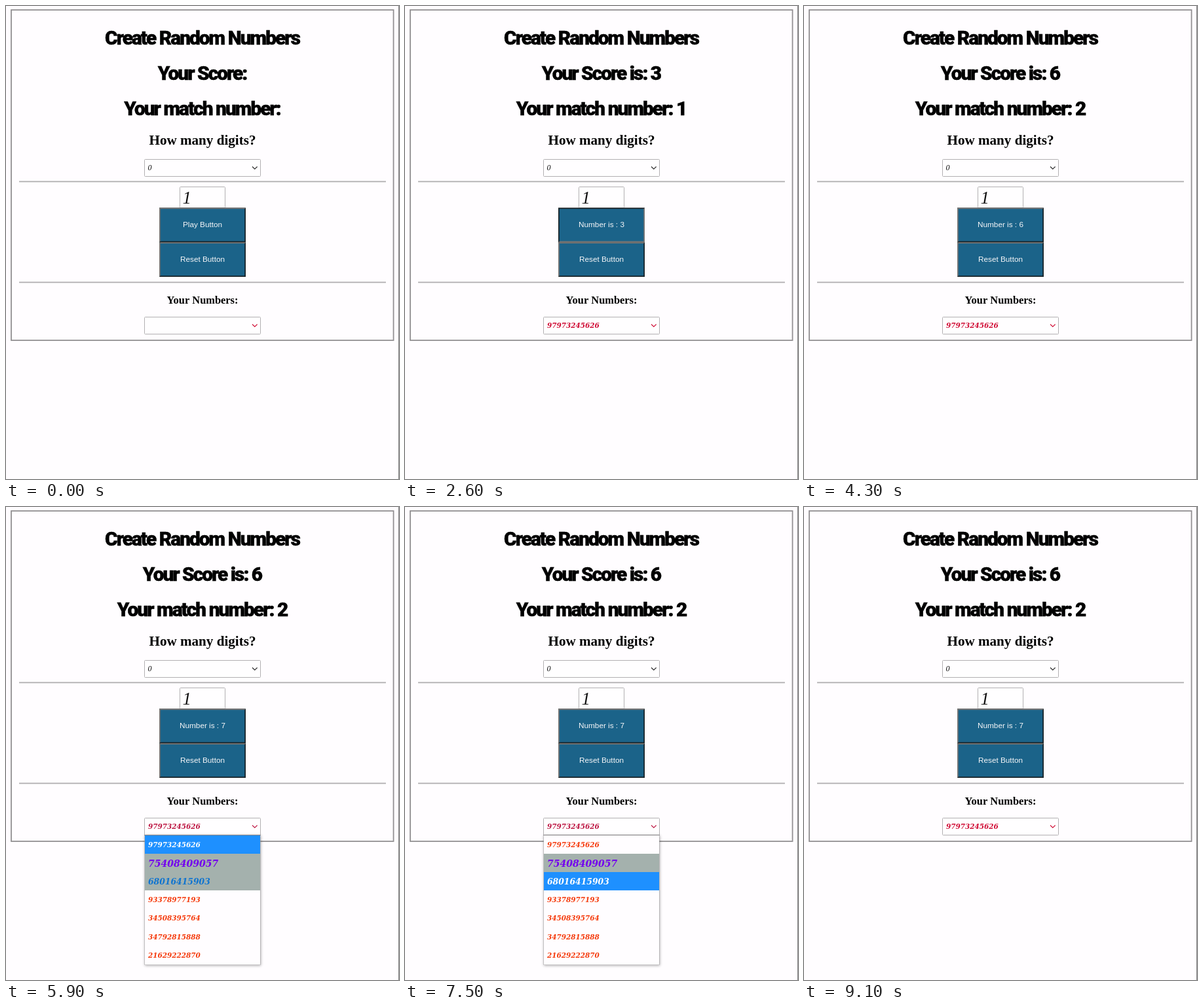
Recreate the animation shown at these times as an HTML page with a canvas. Size 600x723 px, loop 9.2 s.

```html
<!DOCTYPE html>
<html lang="en">
<head>
<meta charset="utf-8">
<title>Create Random Numbers</title>
<style>
html, body { margin: 0; width: 100%; height: 100%; overflow: hidden; background: #fffdff; }
canvas { display: block; }
</style>
</head>
<body>
<canvas id="stage" width="600" height="723"></canvas>
<script>
const ctx = document.getElementById('stage').getContext('2d');
const LOOP = 9200;
const PAGE = '#fffdff';
const SERIF = '"Liberation Serif", serif';
const SANS = '"Liberation Sans", sans-serif';
const DIGITS = '"DejaVu Serif", serif';
const TITLE = 'Create Random Numbers';

const numbers = ['97973245626', '75408409057', '68016415903', '93378977193',
  '34508395764', '34792815888', '21629222870'];
const options = numbers.map((text, i) => ({
  text,
  size: [10.45, 14, 12.4][i] || 10.45,
  color: ['#f53a0c', '#7300ee', '#0f74d0'][i] || '#f53a0c',
  fill: i === 1 || i === 2 ? '#a4b1ad' : PAGE
}));

const plays = [
  { down: 1100, up: 1300, drawn: 1, score: 0, matches: 0 },
  { down: 1800, up: 2000, drawn: 3, score: 3, matches: 1 },
  { down: 2600, up: 2800, drawn: 2, score: 6, matches: 2 },
  { down: 3200, up: 3400, drawn: 4, score: 6, matches: 2 },
  { down: 3600, up: 3800, drawn: 5, score: 6, matches: 2 },
  { down: 4100, up: 4300, drawn: 6, score: 6, matches: 2 },
  { down: 4800, up: 5000, drawn: 7, score: 6, matches: 2 }
];
const menu = { focus: 5300, open: 5900, close: 9100 };
const hovers = [6500, 7400, 8100, 8200, 8300, 8400];

function rect(x, y, w, h, color) {
  ctx.fillStyle = color;
  ctx.fillRect(x, y, w, h);
}

function text(str, x, y, font, color = '#000', align = 'center') {
  ctx.font = font;
  ctx.fillStyle = color;
  ctx.textAlign = align;
  ctx.fillText(str, x, y);
}

function setHeadingFont(family, size) {
  ctx.font = `900 ${size}px ${family}`;
  ctx.fontStretch = 'extra-condensed';
  ctx.letterSpacing = `${-0.065 * size}px`;
}

// Use the narrowest heavy face available for the headings.
function pickHeadingFace() {
  ctx.save();
  const faces = ['"Noto Sans", sans-serif', '"Open Sans", sans-serif', 'Roboto, sans-serif', SANS]
    .map(family => {
      setHeadingFont(family, 100);
      return { family, em: ctx.measureText(TITLE).width / 100 };
    });
  ctx.restore();
  const best = faces.reduce((a, b) => (b.em < a.em ? b : a));
  return { family: best.family, size: Math.min(33, 297 / best.em) };
}
const face = pickHeadingFace();

function heading(str, y) {
  ctx.save();
  setHeadingFont(face.family, face.size);
  ctx.textAlign = 'center';
  ctx.fillStyle = ctx.strokeStyle = '#000';
  ctx.lineWidth = 0.5;
  ctx.lineJoin = 'round';
  ctx.fillText(str, 299.5, y);
  ctx.strokeText(str, 299.5, y);
  ctx.restore();
}

function field(x, y, w, h) {
  ctx.beginPath();
  ctx.roundRect(x + 0.5, y + 0.5, w - 1, h - 1, 1);
  ctx.fillStyle = '#fffeff';
  ctx.fill();
  ctx.strokeStyle = '#b2b0b2';
  ctx.lineWidth = 1;
  ctx.stroke();
}

function selectBox(y, arrowColor) {
  field(211, y, 178, 27);
  ctx.beginPath();
  ctx.moveTo(376, y + 11.5);
  ctx.lineTo(379.8, y + 15.2);
  ctx.lineTo(383.6, y + 11.5);
  ctx.strokeStyle = arrowColor;
  ctx.lineWidth = 1.1;
  ctx.stroke();
}

function rule(y) {
  rect(20, y, 560, 1.8, '#b0aeb0');
}

function button(y, label, pressed) {
  const x = 234, w = 132, h = 52.8, edge = 1.76;
  const light = '#777574', dark = '#1a2429';
  rect(x, y, w, h, pressed ? light : dark);
  ctx.beginPath();
  ctx.moveTo(x, y);
  ctx.lineTo(x + w, y);
  ctx.lineTo(x + w - edge, y + edge);
  ctx.lineTo(x + edge, y + h - edge);
  ctx.lineTo(x, y + h);
  ctx.fillStyle = pressed ? dark : light;
  ctx.fill();
  rect(x + edge, y + edge, w - 2 * edge, h - 2 * edge, '#1b6389');
  text(label, 300, y + 30, `11.75px ${SANS}`, '#f7f7f9');
}

function digits(str, y, size, color) {
  text(str, 217, y, `italic bold ${size}px ${DIGITS}`, color, 'left');
}

function dropdown(hovered) {
  const top = 501.5, rowHeight = 28.2;
  ctx.save();
  ctx.shadowColor = 'rgba(0,0,0,.35)';
  ctx.shadowBlur = 4;
  ctx.shadowOffsetY = 1;
  rect(211.5, 501, 177, 199, '#aaa8aa');
  ctx.restore();
  rect(212, 501, 176, 198.5, PAGE);
  options.forEach((option, i) => {
    const y = Math.round(top + i * rowHeight);
    const next = Math.round(top + (i + 1) * rowHeight);
    const active = i === hovered;
    rect(212, y, 176, next - y, active ? '#1e90ff' : option.fill);
    digits(option.text, y + 14.5 + option.size * 0.365, option.size, active ? '#fff' : option.color);
  });
  rect(211, 501, 178, 1, '#858385');
}

function draw(t) {
  const last = plays.filter(p => t >= p.up).pop();
  const pressed = plays.some(p => t >= p.down && t < p.up);
  const scored = last && last.matches > 0;
  const focused = t >= menu.focus && t < hovers[2];

  rect(0, 0, 600, 723, PAGE);
  rect(599, 0, 1, 723, '#858385');
  ctx.strokeStyle = '#929092';
  ctx.lineWidth = 1.8;
  ctx.strokeRect(8, 6, 583.6, 505);

  heading(TITLE, 59);
  heading(scored ? `Your Score is: ${last.score}` : 'Your Score:', 113);
  heading(scored ? `Your match number: ${last.matches}` : 'Your match number:', 167);
  text('How many digits?', 300, 212, `bold 21.1px ${SERIF}`);

  selectBox(234, '#2a2a2a');
  text('0', 216.5, 251, `italic 12px ${SERIF}`, '#111', 'left');
  rule(267.5);
  field(265, 276, 70, 33);
  text('1', 269.5, 301.5, `italic 27px ${SERIF}`, '#111', 'left');
  button(308.4, last ? `Number is : ${last.drawn}` : 'Play Button', pressed);
  button(361.2, 'Reset Button', false);
  rule(421.5);

  text('Your Numbers:', 300, 455, `bold 16.4px ${SERIF}`);
  const accent = focused ? '#bd1743' : '#d00d35';
  selectBox(475, accent);
  if (last) digits(numbers[0], 492, 10.45, accent);
  if (t >= menu.open && t < menu.close) dropdown(hovers.filter(at => t >= at).length);
}

const start = performance.now();
function tick() {
  draw((performance.now() - start) % LOOP);
  requestAnimationFrame(tick);
}
tick();
</script>
</body>
</html>
```
